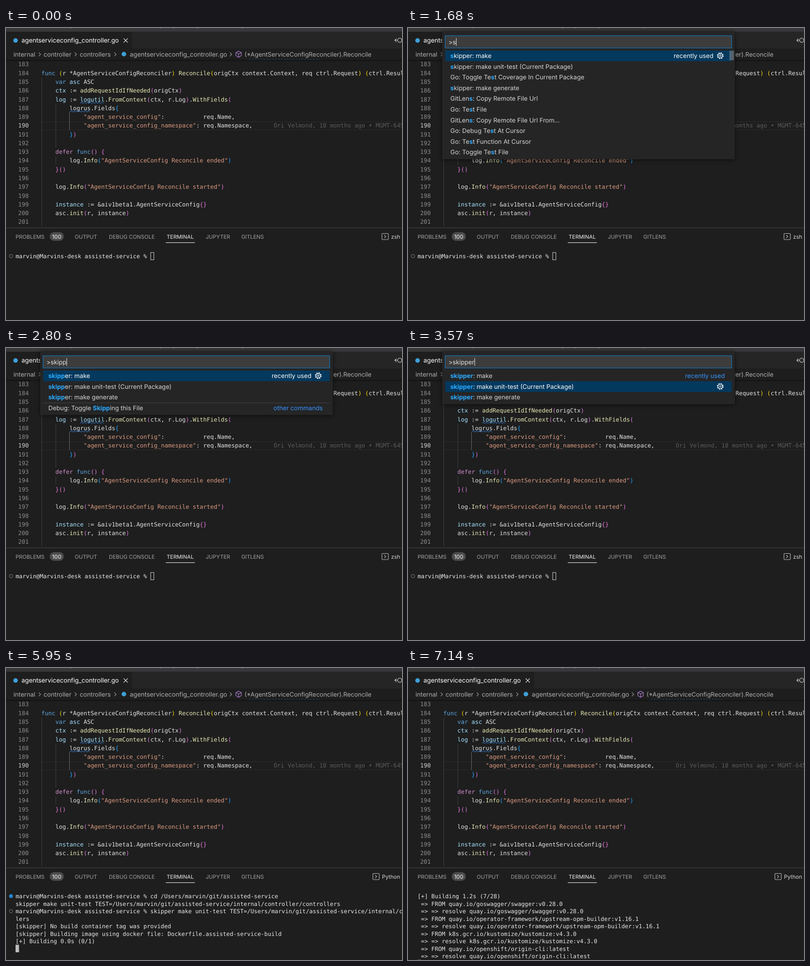
Write an HTML page that moves like this. It is 870 by 643 pixels and loops after 7.28 s.

```html
<!DOCTYPE html>
<html lang="en">
<head>
<meta charset="utf-8">
<title>Editor command palette</title>
<style>
html, body { margin: 0; width: 100%; height: 100%; overflow: hidden; background: #1e1e1e; }
svg { display: block; text-rendering: geometricPrecision; }
text { white-space: pre; }
.ui { font: 13.6px Inter, "Open Sans", sans-serif; }
.file { font: 13.8px Inter, "Open Sans", sans-serif; }
.symbol { font: 13.45px Inter, "Open Sans", sans-serif; }
.tab { font: 11.75px Inter, "Open Sans", sans-serif; }
.small { font: 12px Inter, "Open Sans", sans-serif; }
.code { font: 12.85px "DejaVu Sans Mono", "Liberation Mono", monospace; }
.term { font: 12.62px "DejaVu Sans Mono", "Liberation Mono", monospace; }
.hit { font-weight: 700; fill: #2aaaff; }
#palette { filter: drop-shadow(0 1px 5px rgba(0, 0, 0, .6)); }
</style>
</head>
<body>
<svg width="870" height="643" viewBox="0 0 870 643">
  <g id="editor"></g>
  <g id="panel"></g>
  <g id="terminal"></g>
  <g id="palette"></g>
</svg>
<script>
const LOOP = 7280;
const esc = s => s.replace(/&/g, '&amp;').replace(/</g, '&lt;').replace(/>/g, '&gt;');
const markup = (x, y, cls, fill, inner, anchor = 'start') =>
  `<text x="${x}" y="${y}" class="${cls}" fill="${fill}" text-anchor="${anchor}">${inner}</text>`;
const text = (x, y, cls, fill, s, anchor) => markup(x, y, cls, fill, esc(s), anchor);
const rect = (x, y, w, h, fill, extra = '') =>
  `<rect x="${x}" y="${y}" width="${w}" height="${h}" fill="${fill}" ${extra}/>`;
const line = (d, stroke, w = 1, extra = '') =>
  `<path d="${d}" fill="none" stroke="${stroke}" stroke-width="${w}" ${extra}/>`;
const circle = (x, y, r, fill, extra = '') => `<circle cx="${x}" cy="${y}" r="${r}" fill="${fill}" ${extra}/>`;
const put = (id, html) => { document.getElementById(id).innerHTML = html; };

// ---- Editor ----
const COL = 7.736, ROW = 19.28, LEFT = 77.6;
const rowY = n => 80 + (n - 183) * ROW;
const colors = {
  k: '#5ea6e0', t: '#e2e2e2', v: '#a6e2ff', f: '#e6e6b4', s: '#da9a80',
  d: '#cf8fca', 1: '#ffd700', 2: '#e078dc', 3: '#22a4ff', g: '#5c5c5c'
};
// Each segment starts with its colour key; "|" separates segments.
const source = {
  184: [0, 'kfunc |1(|tr *AgentServiceConfigReconciler|1) |fReconcile|1(|torigCtx context.Context, req ctrl.Request|1) (|tctrl.Result, error'],
  185: [4, 'kvar |vasc |tASC'],
  186: [4, 'vctx |t:= |faddRequestIdIfNeeded|2(|torigCtx|2)'],
  187: [4, 'vlog |t:= |vlogutil|t.|fFromContext|2(|tctx, r.Log|2)|t.|fWithFields|2('],
  188: [8, 'tlogrus.Fields|3{'],
  189: [12, 's"agent_service_config"|t:           req.Name,'],
  190: [12, 's"agent_service_config_namespace"|t: req.Namespace,|g      Ori Velmond, 18 months ago • MGMT-645'],
  191: [8, '3}|2)'],
  193: [4, 'ddefer |kfunc|2() {'],
  194: [8, 'tlog.|fInfo|3(|s"AgentServiceConfig Reconcile ended"|3)'],
  195: [4, '2}()'],
  197: [4, 'tlog.|fInfo|2(|s"AgentServiceConfig Reconcile started"|2)'],
  199: [4, 'vinstance |t:= &aiv1beta1.AgentServiceConfig|2{}'],
  200: [4, 'tasc.|finit|2(|tr, instance|2)']
};
const spans = s => s.split('|').map(p => `<tspan fill="${colors[p[0]]}">${esc(p.slice(1))}</tspan>`).join('');
const guide = (col, from, to, color = '#404040') => {
  const x = Math.round(LEFT + col * COL) + .5;
  return line(`M${x} ${rowY(from) - ROW / 2}V${rowY(to) + ROW / 2}`, color);
};
function squiggle(row, col, chars) {
  const half = 3.2, x = LEFT + col * COL, y = rowY(row) + 8.8;
  let d = `M${x} ${y}`;
  for (let i = 1; i * half <= chars * COL; i++) d += `L${x + i * half} ${y + (i % 2 ? -2.6 : 0)}`;
  return line(d, '#3794ff');
}
const chevron = x => line(`M${x - 2} 54l4 4l-4 4`, '#a0a0a0', 1.1);

function editor() {
  let out = rect(0, 0, 870, 8, '#38383a') + rect(0, 8, 870, 37, '#252526') + rect(0, 8, 277, 37, '#1e1e1e');
  out += line('M142 .5h2M338 .5h3M367 .5h3M419 .5h3M518 .5h3', '#777');
  out += circle(21, 27.5, 5, '#3f9fd8') + text(34, 32, 'file', '#fff', 'agentserviceconfig_controller.go');
  out += line('M258.5 23l9 9M267.5 23l-9 9', '#ddd', 1.2);
  out += line('M860 27h-5M858 23.5l-4 3.5l4 3.5', '#c5c5c5', 1.2) + circle(865, 27, 4.6, 'none', 'stroke="#c5c5c5" stroke-width="1.3"');

  out += line('M534 69H690', '#245c92', 1, 'stroke-dasharray="3 3.4"');
  [[16.5, 'ui', 'internal'], [82.5, 'ui', 'controller'], [162, 'ui', 'controllers'],
   [272, 'file', 'agentserviceconfig_controller.go'], [524, 'symbol', '(*AgentServiceConfigReconciler).Reconcile']]
    .forEach(([x, cls, s]) => out += text(x, 62.7, cls, '#b0b0b0', s));
  out += [74, 153, 240, 494].map(chevron).join('') + circle(259, 57.5, 5, '#3f9fd8');
  out += line('M511 51l6 3v7l-6 3.5l-6-3.5v-7zM505 54l6 3.2l6-3.2M511 57.2v7', '#b180d7', 1.2);
  out += rect(0, 70, 870, 1.5, '#121212') + rect(0, 71.5, 870, 2, '#191919');

  out += line('M78 206.5H870M78 224.5H870', '#2b2b2b');
  out += guide(0, 185, 201) + guide(4, 188, 192) + guide(8, 189, 190, '#707070') + guide(4, 194, 194);
  for (let n = 183; n <= 201; n++) {
    const y = rowY(n) + 4.4;
    out += text(50, y, 'code', n === 190 ? '#d0d0d0' : '#8c8c8c', '' + n, 'end');
    if (source[n]) out += markup(LEFT + source[n][0] * COL, y, 'code', '#e2e2e2', spans(source[n][1]));
  }
  return out + squiggle(187, 11, 7) + squiggle(188, 8, 6);
}

function panelTabs() {
  let out = rect(0, 440, 870, 203, '#1e1e1e') + rect(0, 439.5, 870, 1, '#4a4a4a');
  [[21, 'PROBLEMS'], [151, 'OUTPUT'], [226, 'DEBUG CONSOLE'], [353, 'TERMINAL'], [439, 'JUPYTER'], [517, 'GITLENS']]
    .forEach(([x, s]) => out += text(x, 463.5, 'tab', s === 'TERMINAL' ? '#f0f0f0' : '#a2a2a2', s));
  return out + rect(96, 449.5, 31, 19, '#4d4d4d', 'rx="9.5"') + text(111.5, 463.5, 'small', '#fff', '100', 'middle')
    + rect(351, 472, 64, 1.2, '#e7e7e7');
}

// ---- Command palette ----
const skippers = ['skipper: make', 'skipper: make unit-test (Current Package)', 'skipper: make generate'];
const recent = [skippers[0], skippers[1], 'Go: Toggle Test Coverage In Current Package', skippers[2],
  'GitLens: Copy Remote File Url', 'Go: Test File', 'GitLens: Copy Remote File Url From...',
  'Go: Debug Test At Cursor', 'Go: Test Function At Cursor', 'Go: Toggle Test File'];
const tasks = ['Configure Task', 'Run Task', 'Run Build Task', 'Run Test Task', 'Show Running Tasks', 'Restart Running Task']
  .map(s => 'Tasks: ' + s);
const skipping = 'Debug: Toggle Skipping this File';

function itemsFor(query) {
  if (query.length < 2) return recent;
  if (query === 'sk') return [...skippers, skipping, ...tasks];
  return query.length < 6 ? [...skippers, skipping] : skippers;
}
function highlight(s, query) {
  const i = query ? s.toLowerCase().indexOf(query) : -1;
  if (i < 0) return esc(s);
  const end = i + query.length;
  return esc(s.slice(0, i)) + `<tspan class="hit">${esc(s.slice(i, end))}</tspan>` + esc(s.slice(end));
}
const gear = y => circle(686, y, 6.2, 'none', 'stroke="#fff" stroke-width="2" stroke-dasharray="2.6 2.27"')
  + circle(686, y, 4.9, 'none', 'stroke="#fff" stroke-width="1.1"') + circle(686, y, 1.9, 'none', 'stroke="#fff" stroke-width="1.1"');

function drawPalette(query, selected) {
  const items = itemsFor(query), step = 23.6;
  let out = rect(75, 7, 643, 46 + step * items.length, '#252526', 'rx="2"');
  out += rect(81.5, 17, 629.5, 27, '#3c3c3c', 'stroke="#1479bd" stroke-width="1.2"');
  out += text(89, 35.7, 'ui', '#e0e0e0', '>' + query);
  items.forEach((s, i) => {
    const y = 61 + i * step, on = i === selected;
    if (on) out += rect(82, y - 11.3, 629, 23.4, '#04395e') + gear(y);
    out += markup(93, y + 5, 'ui', on ? '#fff' : '#d6d6d6', highlight(s, query));
    const label = i === 0 ? 'recently used' : s === skipping ? 'other commands' : '';
    if (label) out += text(on ? 671 : 696, y + 5, 'ui', on ? '#fff' : '#3794ff', label, 'end');
    if (s === skipping) out += rect(82, y - 11.4, 629, 1, '#454545');
  });
  if (items.length > 9) out += rect(706, 50, 10, 21, '#6c7a86', 'opacity=".7"');
  put('palette', out);
  const typed = document.querySelector('#palette text').getComputedTextLength();
  document.getElementById('palette').insertAdjacentHTML('beforeend', rect(89.3 + typed, 22.5, 1.2, 16.5, '#ddd'));
}

// ---- Terminal ----
const CELL = 7.597, LINE = 16.5;
const prompt = 'marvin@Marvins-desk assisted-service % ';
const repo = '/Users/marvin/git/assisted-service';
const run = `skipper make unit-test TEST=${repo}/internal/controller/controllers`;
const cdLines = [prompt + 'cd ' + repo, run];
const started = [...cdLines, prompt + run.slice(0, -4), 'lers'];
const building = [...started, '[skipper] No build container tag was provided',
  '[skipper] Building image using docker file: Dockerfile.assisted-service-build'];
const images = ['quay.io/goswagger/swagger:v0.28.0', 'quay.io/operator-framework/upstream-opm-builder:v1.16.1',
  'k8s.gcr.io/kustomize/kustomize:v4.3.0', 'quay.io/openshift/origin-cli:latest'];
const status = (sec, done) => `[+] Building ${sec}s (${done})`;
const definition = [' => [internal] load build definition from Dockerfile.assisted-service-build',
  ' => => transferring dockerfile: 4.28kB'];
const metadata = [...definition, ' => [internal] load .dockerignore', ' => => transferring context: 2B',
  ...images.map(s => ' => [internal] load metadata for ' + s)];
const resolving = images.flatMap(s => [' => FROM ' + s, ' => => resolve ' + s]);

const terminalAt = [
  [0, [prompt]], [4200, cdLines], [4340, started], [5250, building],
  [5950, [...building, status('0.0', '0/1')]],
  [6090, [...building, status('0.2', '1/2'), ...definition]],
  [6230, [...building, status('0.3', '2/2'), ...definition]],
  [6370, [status('0.4', '2/9'), ...metadata]],
  [6510, [status('0.6', '2/9'), ...metadata]],
  [6650, [status('0.7', '3/9'), ...metadata]],
  [6860, [status('0.9', '5/9'), ...metadata]],
  [7000, [status('1.1', '7/28'), ...resolving]],
  [7140, [status('1.2', '7/28'), ...resolving]]
];
const queryAt = [[910, ''], [1610, 's'], [2100, 'sk'], [2310, 'ski'], [2520, 'skip'], [2730, 'skipp'], [2940, 'skippe'], [3150, 'skipper']];
const pick = (list, t) => list.filter(e => e[0] <= t).pop()[1];

function drawTerminal(rows, process, focused) {
  const px = process === 'zsh' ? 826 : 806;
  let out = rect(px, 452.5, 14, 13.5, 'none', 'rx="1.5" stroke="#c5c5c5" stroke-width="1.1"')
    + line(`M${px + 5} 456l3.5 3.3l-3.5 3.3`, '#c5c5c5', 1.1) + text(px + 20, 463.8, 'small', '#d6d6d6', process);
  rows.forEach((s, i) => {
    const y = 503 + i * LINE;
    out += text(21, y + 4.3, 'term', '#e8e8e8', s);
    if (!s.startsWith(prompt)) return;
    out += i === 0 && rows.length > 1 ? circle(11, y - .8, 4.3, '#2486d1')
      : circle(11, y - .8, 3.6, 'none', 'stroke="#707070" stroke-width="1.2"');
  });
  const waiting = rows.length === 1;
  const cx = 21 + (waiting ? prompt.length * CELL : 0), cy = 494 + (waiting ? 0 : rows.length) * LINE;
  out += focused ? rect(cx, cy, 7.6, LINE, '#bdbdbd')
    : rect(cx + .6, cy + .4, 7, 16, 'none', 'stroke="#c8c8c8" stroke-width="1.1"');
  put('terminal', out);
}

// ---- Playback ----
put('editor', editor());
put('panel', panelTabs());
let lastPalette, lastTerminal;
function frame() {
  const t = performance.now() % LOOP;
  const open = t >= 910 && t < 4130;
  const query = open ? pick(queryAt, t) : null, selected = t < 3430 ? 0 : 1;
  const paletteKey = query + '/' + selected;
  if (paletteKey !== lastPalette) {
    lastPalette = paletteKey;
    open ? drawPalette(query, selected) : put('palette', '');
  }
  const rows = pick(terminalAt, t), process = t < 5110 ? 'zsh' : 'Python', focused = t >= 4130;
  const terminalKey = rows.join('\n') + process + focused;
  if (terminalKey !== lastTerminal) {
    lastTerminal = terminalKey;
    drawTerminal(rows, process, focused);
  }
  requestAnimationFrame(frame);
}
frame();
</script>
</body>
</html>
```
